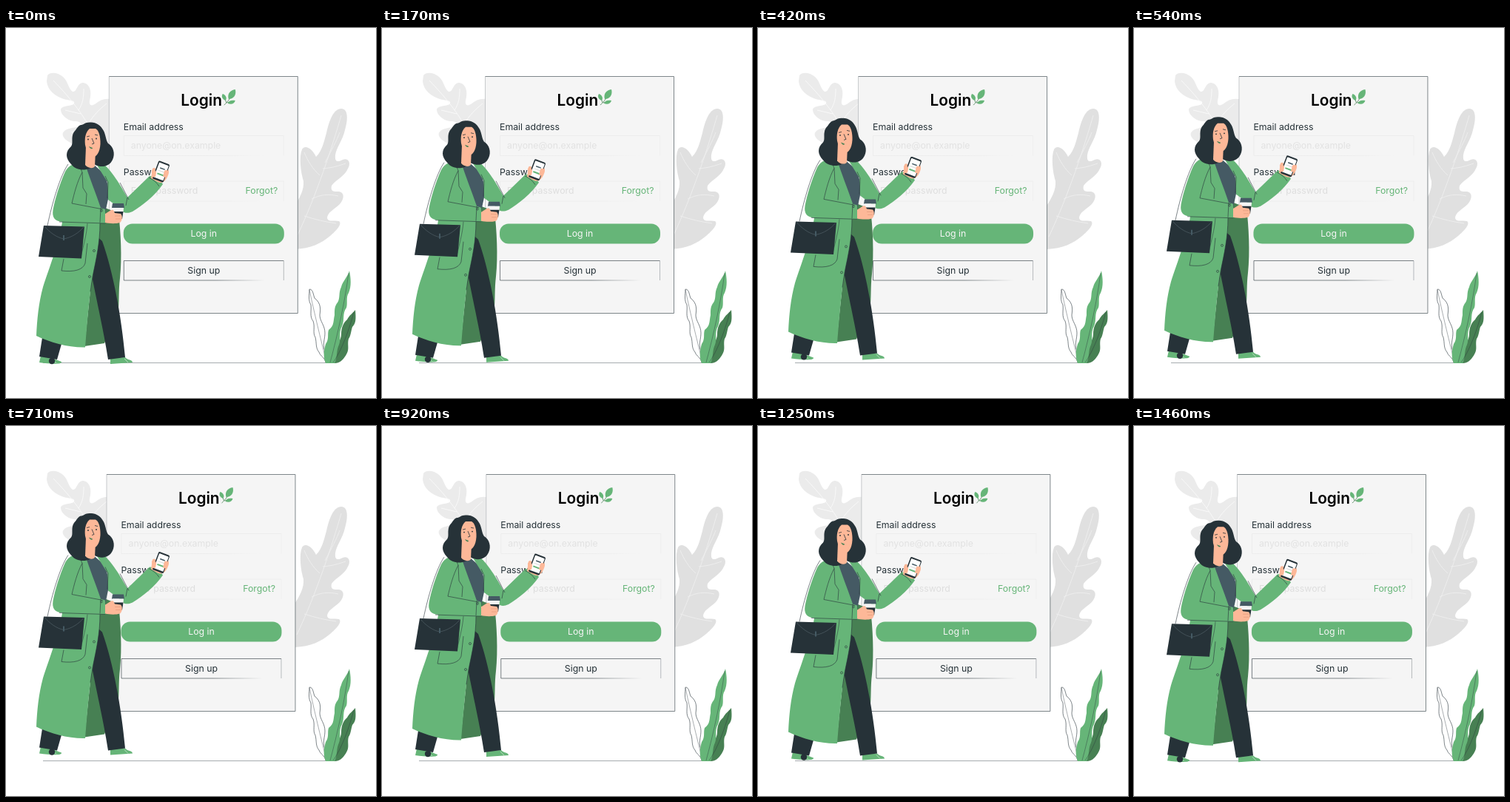
Write an HTML page with a canvas that moves like this. It is 500 px wide and 500 px high and loops after 1500 ms.

```html
<!DOCTYPE html>
<html lang="en">
<head>
<meta charset="utf-8">
<title>Login</title>
<style>
  html, body { margin: 0; width: 100%; height: 100%; overflow: hidden; background: #fff; }
  canvas { display: block; width: 500px; height: 500px; }
</style>
</head>
<body>
<canvas id="stage"></canvas>
<script>
const LOOP = 1500, LEAD = 30;
const GREEN = '#66b578', DEEP = '#478053', DARK = '#263238', SLATE = '#455a64', SKIN = '#fdb898';
const SHAKE = [0, -1, 2, -4, 4, -4, 4, -4, 2, -1, 0];

const canvas = document.getElementById('stage');
const ctx = canvas.getContext('2d');
const ratio = window.devicePixelRatio || 1;
canvas.width = canvas.height = 500 * ratio;

const paths = new Map();
function path(d) {
  if (!paths.has(d)) paths.set(d, new Path2D(d));
  return paths.get(d);
}
function fill(color, d) {
  ctx.fillStyle = color;
  ctx.fill(path(d));
}
function line(color, d, width = 0.6) {
  ctx.strokeStyle = color;
  ctx.lineWidth = width;
  ctx.stroke(path(d));
}
function disc(color, x, y, r) {
  ctx.fillStyle = color;
  ctx.beginPath();
  ctx.arc(x, y, r, 0, Math.PI * 2);
  ctx.fill();
}
function ring(x, y, r) {
  ctx.strokeStyle = DARK;
  ctx.lineWidth = 0.6;
  ctx.beginPath();
  ctx.arc(x, y, r, 0, Math.PI * 2);
  ctx.stroke();
}
function box(color, x, y, w, h, r = 0) {
  ctx.fillStyle = color;
  ctx.beginPath();
  ctx.roundRect(x, y, w, h, r);
  ctx.fill();
}
function text(str, x, y, color, font = '400 12.3px', align = 'left') {
  ctx.font = `${font} Inter, sans-serif`;
  ctx.textAlign = align;
  ctx.fillStyle = color;
  ctx.fillText(str, x, y);
}
function shifted(x, y, draw) {
  ctx.save();
  ctx.translate(x, y);
  draw();
  ctx.restore();
}

function drawBackLeaves() {
  fill('#ebebeb', 'M56 64C60 59 70 60 77 66C84 72 84 82 90 86C96 87 95 76 103 74C112 74 117 84 113 98C112 104 115 106 120 103C128 96 136 94 146 97L146 175C120 168 82 158 77 146C74 136 92 134 100 134C104 130 100 126 94 126C84 126 74 118 74 110C76 104 90 106 92 102C94 98 86 98 78 96C66 92 56 84 55 72Z');
  line('#fafafa', 'M64 71C84 92 102 112 122 150M98 111C104 102 105 93 105 82M101 116L80 111M111 130C118 118 126 110 136 102M113 135L88 141', 0.9);
  fill('#e0e0e0', 'M453 109C463 109 462 125 458 138C455 152 446 162 445 172C444 182 449 181 455 178C462 175 467 182 462 190C458 200 447 204 440 213C438 222 444 221 450 221C457 222 458 230 451 238C444 245 434 249 434 257C436 263 444 259 450 261C455 265 446 274 438 281C426 291 412 298 390 299L390 240C397 230 403 218 402 207C398 194 396 174 400 164C404 157 414 163 419 174C427 166 429 156 433 142C437 124 443 109 453 109Z');
  line('#efefef', 'M453 118C441 160 420 225 393 282M431 182C440 165 447 152 451 141M428 190C441 189 450 186 459 183M424 199C414 190 408 180 403 168M413 231C425 225 436 224 449 227M403 254C418 259 432 262 446 264', 0.9);
}

// Outlined box whose bottom edge fades out to the right.
function fadingBox(y, h, color, sideColor, clear) {
  line(color, `M159.5 ${y + h}V${y}H375.5`);
  line(sideColor, `M375.5 ${y}V${y + h}`);
  const fade = ctx.createLinearGradient(159, 0, 350, 0);
  fade.addColorStop(0, color);
  fade.addColorStop(0.65, color);
  fade.addColorStop(1, clear);
  line(fade, `M159.5 ${y + h}H350`);
}

function drawCard() {
  box('#f5f5f5', 139.5, 65.5, 255, 320);
  line('#b0b5b8', 'M139.5 65.5V385.5', 0.7);
  line('#5f696e', 'M139.5 65.5H394.5V385.5H139.5', 0.8);

  text('Login', 236.5, 105, '#000', '600 20.8px');
  line(DEEP, 'M295 104C300 100 303 95 308 86M298 101L295 92M299 101L307 99', 0.8);
  fill(GREEN, 'M301 96C299 89 303 84 310 83C312 90 308 96 301 96ZM297 98C292 96 291 92 293 89C298 91 299 95 297 98ZM300 102C301 98 305 97 310 98C309 102 305 104 300 102Z');

  text('Email address', 159, 138, DARK);
  fadingBox(145.5, 27, '#e8e8e8', '#ebebeb', '#e8e8e800');
  text('anyone@on.example', 169, 162.5, '#e2e2e2');

  text('Password', 159, 198.5, DARK);
  fadingBox(207, 27, '#e8e8e8', '#ebebeb', '#e8e8e800');
  text('Enter password', 169, 223.5, '#dedede');
  text('Forgot?', 367.5, 223.5, GREEN, undefined, 'right');

  box(GREEN, 159, 264.5, 217, 27, 12);
  text('Log in', 267.5, 282, '#f5f5f5', undefined, 'center');

  fadingBox(314.5, 26.5, DARK, '#8b9397', '#26323800');
  text('Sign up', 267.5, 331.5, DARK, undefined, 'center');
}

function drawPlant() {
  const pale = 'M410 353C415 353 415 360 417 365C426 372 425 380 424 388C424 396 431 402 431 412C431 420 428 426 430 434C435 442 436 447 435 452H432C430 444 425 444 423 438C418 432 420 426 418 418C414 412 418 404 415 396C410 390 413 382 412 374C408 368 410 360 410 353Z';
  fill('#fff', pale);
  line(DARK, pale);
  line(DARK, 'M410 354C416 382 425 420 433 451', 0.4);
  fill(DEEP, 'M472 381C473 393 473 399 468 404C466 410 466 416 463 420C461 427 464 433 461 439C457 447 452 453 444 453H438C440 444 446 440 447 432C447 426 453 422 453 414C453 405 456 398 461 394C464 388 468 386 472 381Z');
  fill(GREEN, 'M464 328C466 338 467 349 463 358C459 364 462 372 460 378C454 386 458 394 454 403C449 412 453 420 450 428C446 436 448 446 444 453H432C428 443 430 434 432 427C437 420 434 414 436 408C444 402 442 396 444 388C444 380 444 376 448 371C452 365 449 358 453 350C455 342 462 336 464 328Z');
  line(DARK, 'M463 331C458 370 448 415 438 452M470 384C462 414 452 438 442 452', 0.4);
}

function drawLegs() {
  fill(GREEN, 'M47 443L62 446L75 451C76 455 60 454 45 452ZM141 446L161 445C164 449 171 448 171 452L141 454Z');
  line('#d7efdc', 'M64 449L68 453M160 447L165 452', 0.7);
  disc(DARK, 62, 450, 4.2);
  fill(DEEP, 'M126 240L152 250C155 275 157 310 154 338C152 355 153 368 152 378L133 426L106 430Z');
  fill(DARK, 'M50 412L45 444L69 448L77 420ZM121 280L130 288C145 330 156 390 161 445L138 448C134 420 125 380 117 340Z');
}

function drawCoat() {
  fill(SLATE, 'M104 188L119 185L134 198L140 222L134 250L122 258Z');
  fill(GREEN, 'M128 181C142 190 156 215 164 229L194 200C200 200 208 205 212 211C202 226 184 240 171 248C162 252 156 249 153 243L138 232L137 208L122 184Z');
  fill(GREEN, 'M106 181C94 181 84 186 80 194C72 212 66 232 63.5 246C62 256 66 261 76 262C72 290 58 325 50 350C44 372 42 394 41 416C60 425 84 432 107 431.5C110 395 112 366 117 336C122 312 127 290 127 264L134 264V245L128 243C121 222 113 203 106 181Z');
  line(DARK, 'M84 184C73 200 62 238 56 267M100 188L103 195C96 208 92 224 89 237L131 245M103 195L104 216L109 224L108 238M72 262L134 264M128 243L127 263M134 200L138 209L137 230M154 209L166 232M164 229L162 240M193 202C199 205 204 209 207 214');
  line(DARK, 'M110 291L107 318C104 327 92 330 75 328L78 312M127 264C127 290 122 312 117 336L114 356');
  ring(119, 301, 1.5);
  ring(113, 336, 1.5);
  ring(129, 247, 1.3);
}

function drawBag() {
  fill(DARK, 'M51 267L106 268.5L102 311.5L44 309Z');
  line('#607078', 'M52 268C59 276 68 283 78 285C89 283 98 277 105 269', 0.5);
  line(SLATE, 'M78 280V287', 2);
  line(DARK, 'M101 310C104 296 109 280 110 264', 0.5);
}

function drawCup() {
  fill(SLATE, 'M144 237H159L160 243H143Z');
  fill('#f5f5f5', 'M144 243H159L158.5 249H145Z');
  fill(DARK, 'M145 248H158.5L157 258H147Z');
  fill(SKIN, 'M134 251C139 249 141 245 145 246L147 250L155 251C158 254 157 261 154 263C147 265 139 264 134 263Z');
  line('#d98e70', 'M147 254H155M148 258H155', 0.5);
}

function drawPhone() {
  fill(SKIN, 'M196 203L198 190C201 187 204 191 203 197L212 202L214 191C218 187 222 193 219 199C216 207 211 211 205 208Z');
  ctx.save();
  ctx.translate(209.5, 194);
  ctx.rotate(0.36);
  box(DARK, -8, -13, 16, 26, 2);
  box('#fff', -6.5, -11, 13.5, 21.5, 0.8);
  box(SLATE, -3, -5, 7, 1.5);
  box('#ddd', -4, -1, 9, 1.2);
  box(GREEN, -4, 3, 9, 2);
  ctx.restore();
  fill(SKIN, 'M197 192C200 190 203 192 203 196L202 201L197 202ZM214 193C217 191 220 192 219 196L216 202L212 201Z');
}

function drawHead() {
  fill(DARK, 'M101 131C105 131 107 127 114 127.5C121 127 128 131 132 139C135 145 135 152 138 156C145 160 148 170 144 178C140 187 129 190 119 184C115 193 96 195 88 184C80 176 80 167 88 160C92 155 86 146 94 138C96 135 98 132 101 131Z');
  fill(SKIN, 'M108 160L121 166L120 187C117 191 110 189 107 185Z');
  fill(SKIN, 'M113 136C107 141 106 150 107 158C109 168 114 174 119 174C124 173 128 164 127.5 153C127 144 125 138 121 136Z');
  line(DARK, 'M109 147L113 146M120 144L124 145M116 149L119 156L116 157', 0.8);
  disc(DARK, 111, 150.5, 0.9);
  disc(DARK, 122, 149.5, 0.9);
  fill(DEEP, 'M112 160L117 162C117 164 114 164 112 160Z');
}

function drawWoman() {
  drawLegs();
  drawCoat();
  drawHead();
  drawBag();
  drawCup();
  drawPhone();
}

function shakeAt(p) {
  const i = Math.floor(p * 10), part = p * 10 - i;
  return SHAKE[i] + (SHAKE[i + 1] - SHAKE[i]) * part;
}
function floatAt(p) {
  return 0.4 - 10 * (1 - Math.abs(2 * p - 1));
}

function render() {
  const p = ((performance.now() + LEAD) % LOOP) / LOOP;
  ctx.setTransform(ratio, 0, 0, ratio, 0, 0);
  box('#fff', 0, 0, 500, 500);
  drawBackLeaves();
  shifted(shakeAt(p), 0, drawCard);
  line('#6b757a', 'M50 452.5H432', 0.6);
  drawPlant();
  shifted(0, floatAt(p), drawWoman);
  requestAnimationFrame(render);
}
render();
</script>
</body>
</html>
```
